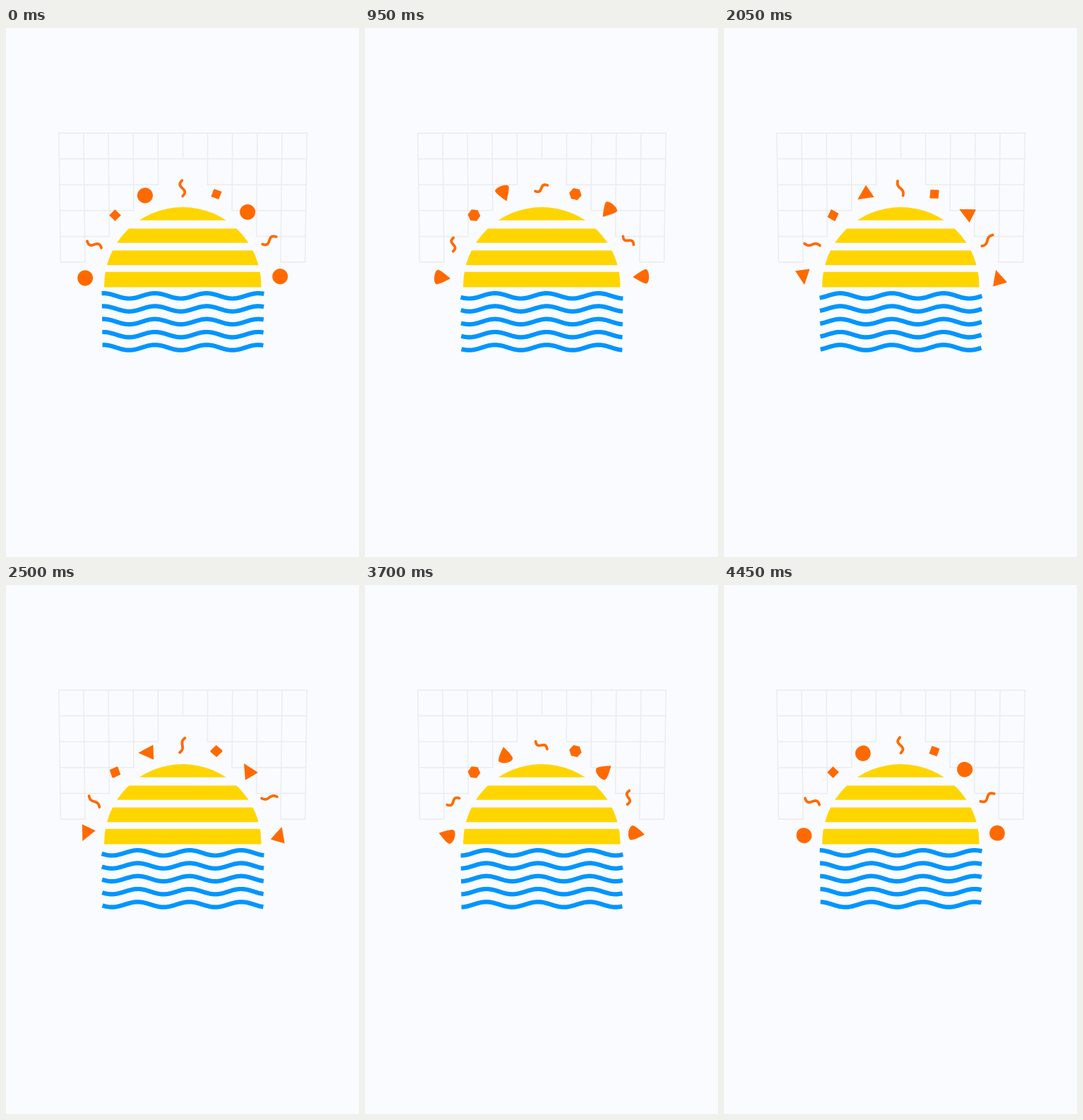
These frames come from a looping animation (500x750 px, 4500 ms). An HTML page with a canvas:

```html
<!DOCTYPE html>
<html lang="en">
<head>
<meta charset="utf-8">
<title>Sunset</title>
<style>
html, body { margin: 0; width: 100%; height: 100%; overflow: hidden; background: #fafbfe; }
canvas { display: block; }
</style>
</head>
<body>
<canvas id="stage" width="500" height="750"></canvas>
<script>
const ctx = document.getElementById('stage').getContext('2d');
const LOOP = 4500, STEP = 50, TAU = Math.PI * 2;
const BG = '#fafbfe', GRID = '#ebecee', SUN = '#ffd500', SEA = '#0095ff', CONFETTI = '#ff6a00';

// x, y, angle in degrees
const drops = [[197.5, 237.6, 0], [112.6, 354.2, -63], [342.2, 261.4, 61], [387.9, 352.6, 108]];
const gems = [[154.5, 265.5, 0], [298, 235.5, 66]];
const squiggles = [[249.8, 227.2, 87.6], [125, 307, 25], [373, 301.3, 152]];

const rad = deg => deg * Math.PI / 180;
const mix = (a, b, k) => a + (b - a) * k;

// cubic-bezier(p, 0, 1 - p, 1)
function ease(x, p) {
  let lo = 0, hi = 1;
  for (let i = 0; i < 24; i++) {
    const s = (lo + hi) / 2, r = 1 - s;
    if (3 * r * r * s * p + 3 * r * s * s * (1 - p) + s ** 3 < x) lo = s;
    else hi = s;
  }
  return lo * lo * (3 - 2 * lo);
}

function line(x1, y1, x2, y2) {
  ctx.moveTo(x1, y1);
  ctx.lineTo(x2, y2);
}

function placed([x, y, angle], turn, draw) {
  ctx.save();
  ctx.translate(x, y);
  ctx.rotate(rad(angle + turn));
  ctx.beginPath();
  draw();
  ctx.restore();
}

function drawGrid() {
  const py = row => 149 + 36.6 * row;
  const px = (col, row) => 250.5 + (col - 5) * 35.15 * (1 - 0.003 * row);
  ctx.strokeStyle = GRID;
  ctx.lineWidth = 1.5;
  ctx.lineCap = 'square';
  ctx.beginPath();
  for (let col = 0; col <= 10; col++) {
    const rows = Math.min(5, Math.abs(col - 5) + 1);
    line(px(col, 0), py(0), px(col, rows), py(rows));
  }
  line(px(0, 0), py(0), px(10, 0), py(0));
  for (let row = 1; row <= 5; row++) {
    const cols = 6 - row;
    line(px(0, row), py(row), px(cols, row), py(row));
    line(px(10 - cols, row), py(row), px(10, row), py(row));
  }
  ctx.stroke();
}

function drawSun() {
  ctx.save();
  ctx.beginPath();
  ctx.arc(250.3, 365.3, 111.2, 0, TAU);
  ctx.clip();
  ctx.fillStyle = SUN;
  for (const [top, bottom] of [[253, 272.6], [284.4, 304.6], [315.4, 336.2], [345.8, 367.5]])
    ctx.fillRect(130, top, 240, bottom - top);
  ctx.restore();
}

function drawSea(t) {
  const length = 73.2, crest = 211 + length * t / 1500;
  ctx.strokeStyle = SEA;
  ctx.lineWidth = 6.2;
  ctx.lineCap = 'butt';
  for (let i = 0; i < 5; i++) {
    const half = 114.9 - 0.25 * i;
    ctx.beginPath();
    for (let k = 0; k <= 230; k++) {
      const x = 250.5 + half * (k / 115 - 1);
      ctx.lineTo(x, 379.8 + 18.3 * i - 3.7 * Math.cos(TAU * (x - crest) / length));
    }
    ctx.stroke();
  }
}

// A circle that sharpens into a triangle with its tip along +x
function drop(m) {
  const c = -0.5 - 4.5 * Math.min(1, 3 * m);
  const tip = mix(c + 11, 10, m);
  const bx = mix(c - 5.5, -11.3, m), by = mix(9.53, 10.4, m);
  const k = 8.47, kTip = k * Math.max(0, 1 - 2.5 * m), kSide = k * (1 - m), kBack = k * (1 - m * m);
  const ux = Math.cos(rad(30)), uy = 0.5;
  ctx.moveTo(tip, 0);
  ctx.bezierCurveTo(tip, kTip, bx + ux * kSide, by + uy * kSide, bx, by);
  ctx.bezierCurveTo(bx - ux * kBack, by - uy * kBack, bx - ux * kBack, -by + uy * kBack, bx, -by);
  ctx.bezierCurveTo(bx + ux * kSide, -by - uy * kSide, tip, -kTip, tip, 0);
  ctx.fill();
}

// A square whose two opposite corners split to make a hexagon
function gem(q) {
  const r = 8.3 + 0.6 * q, split = 30 * q;
  for (const a of [0, 90 - split, 90 + split, 180, 270 - split, 270 + split])
    ctx.lineTo(r * Math.cos(rad(a)), r * Math.sin(rad(a)));
  ctx.fill();
}

function squiggle(half, height) {
  for (let k = -20; k <= 20; k++)
    ctx.lineTo(half * k / 20, -height * Math.sin(Math.PI * k / 20));
  ctx.stroke();
}

function drawConfetti(x) {
  const turn = 360 * ease(x, 0.1);
  const dropTurn = 25 + 270 * ease(x, 0.167);
  const q = Math.min(1, 1.8 * Math.sin(TAU * x) ** 2);
  ctx.fillStyle = ctx.strokeStyle = CONFETTI;
  ctx.lineWidth = 3.8;
  ctx.lineCap = 'round';
  ctx.lineJoin = 'round';
  for (const d of drops) placed(d, dropTurn, () => drop(Math.sin(Math.PI * x)));
  for (const g of gems) placed(g, turn, () => gem(q));
  for (const s of squiggles)
    placed(s, turn, () => squiggle(10.3 + 0.8 * Math.cos(2 * TAU * x), 2.6 + 0.7 * Math.cos(TAU * x)));
}

function frame(now) {
  const t = Math.floor(now / STEP) * STEP % LOOP;
  ctx.fillStyle = BG;
  ctx.fillRect(0, 0, 500, 750);
  drawGrid();
  drawSun();
  drawSea(t);
  drawConfetti(t / LOOP);
  requestAnimationFrame(frame);
}
requestAnimationFrame(frame);
</script>
</body>
</html>
```
